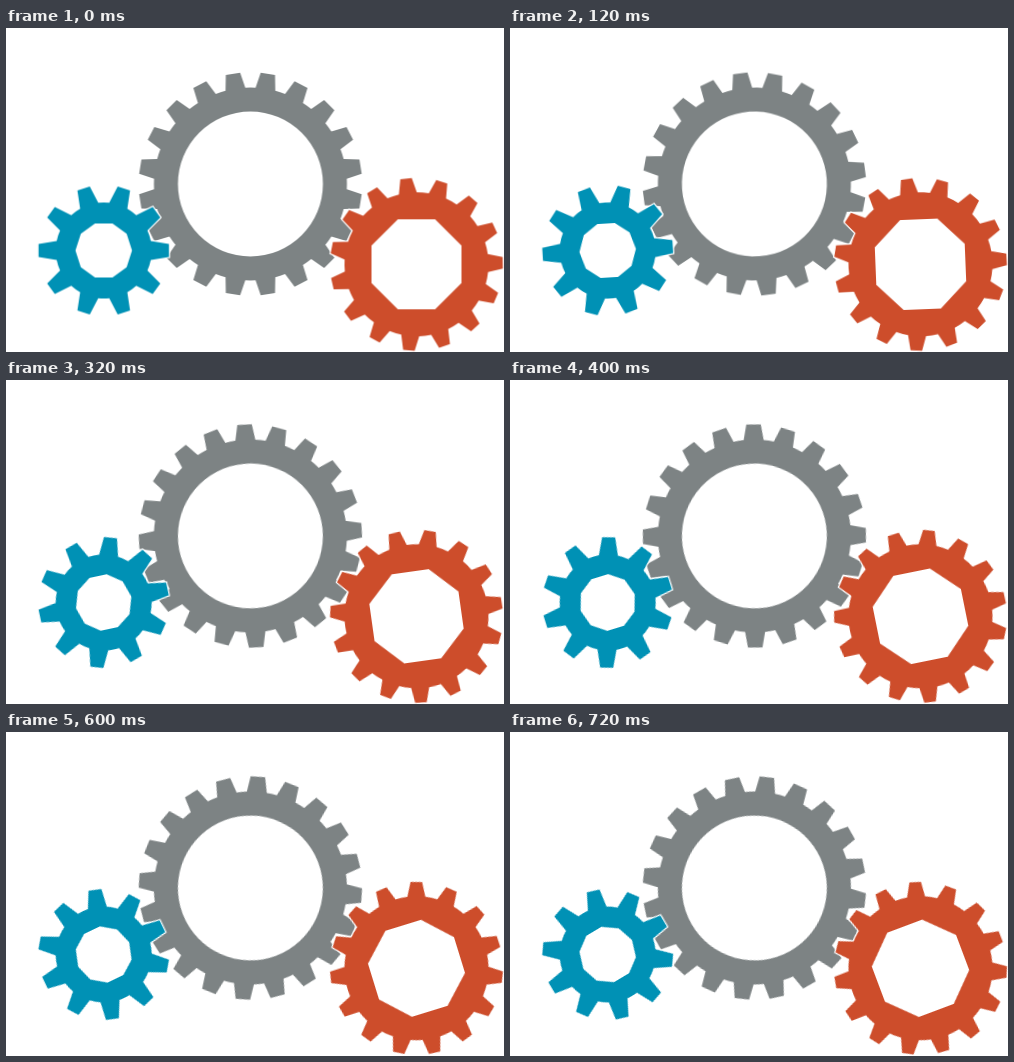
These frames come from a looping animation (498x324 px, 840 ms). An HTML page:

```html
<!DOCTYPE html>
<html lang="en">
<head>
<meta charset="utf-8">
<title>Gears</title>
<style>
  html, body { margin: 0; width: 100%; height: 100%; overflow: hidden; background: #fff; }
  svg { display: block; width: 498px; height: 324px; }
  path {
    fill-rule: evenodd;
    stroke: #fff;
    stroke-width: 2.4;
    paint-order: stroke;
    transform-origin: 0 0;
    animation: turn 840ms step-end infinite;
  }
  /* a loop is 21 ticks of 40 ms; --tick is the turn per tick */
  @keyframes turn {
    0%       { transform: rotate(0deg); }
    14.2857% { transform: rotate(calc(var(--tick) * 2)); }
    23.8095% { transform: rotate(calc(var(--tick) * 5)); }
    38.0952% { transform: rotate(calc(var(--tick) * 7)); }
    47.6190% { transform: rotate(calc(var(--tick) * 10)); }
    61.9048% { transform: rotate(calc(var(--tick) * 12)); }
    71.4286% { transform: rotate(calc(var(--tick) * 15)); }
    85.7143%, 100% { transform: rotate(calc(var(--tick) * 18)); }
  }
</style>
</head>
<body>
<svg viewBox="0 0 498 324">
  <g transform="translate(244.4 156)"><path id="gray" fill="#7d8384"/></g>
  <g transform="translate(97.7 222.5)"><path id="blue" fill="#0091b5"/></g>
  <g transform="translate(410.5 236.3)"><path id="orange" fill="#cd4d2b"/></g>
</svg>
<script>
  const TAU = Math.PI * 2;
  const TICKS = 21;
  const num = v => v.toFixed(2);

  // Turns the point (x, y) by angle a
  function spin(x, y, a) {
    const c = Math.cos(a), s = Math.sin(a);
    return num(x * c - y * s) + ' ' + num(x * s + y * c);
  }

  function rim({ teeth, outer, root, tip, base, phase }) {
    const foot = Math.sqrt(root * root - base * base / 4);
    const arc = `A${root} ${root} 0 0 1 `;
    let d = '';
    for (let i = 0; i < teeth; i++) {
      const a = (i + phase) * TAU / teeth;
      d += (i ? arc : 'M') + spin(foot, -base / 2, a);
      d += 'L' + spin(outer, -tip / 2, a);
      d += 'L' + spin(outer, tip / 2, a);
      d += 'L' + spin(foot, base / 2, a);
    }
    return d + arc + spin(foot, -base / 2, phase * TAU / teeth) + 'Z';
  }

  function polygon(sides, r, phase) {
    const pts = Array.from({ length: sides }, (_, i) => spin(r, 0, (i + phase) * TAU / sides));
    return 'M' + pts.join('L') + 'Z';
  }

  const circle = r => `M${r} 0A${r} ${r} 0 1 1 ${-r} 0A${r} ${r} 0 1 1 ${r} 0Z`;

  // Each gear moves on by one tooth per loop; dir 1 is clockwise
  function gear(id, dir, shape, hole) {
    const path = document.getElementById(id);
    path.setAttribute('d', rim(shape) + hole);
    path.style.setProperty('--tick', `${dir * 360 / shape.teeth / TICKS}deg`);
  }

  gear('gray', 1, { teeth: 20, outer: 111.5, root: 96.5, tip: 14.5, base: 20, phase: 0.5 }, circle(72.5));
  gear('blue', -1, { teeth: 10, outer: 65.2, root: 48, tip: 13, base: 19, phase: 0 }, polygon(10, 28.3, 0));
  gear('orange', -1, { teeth: 15, outer: 86.3, root: 72, tip: 11.5, base: 18, phase: -0.04 }, polygon(8, 48.7, 0.5));
</script>
</body>
</html>
```
